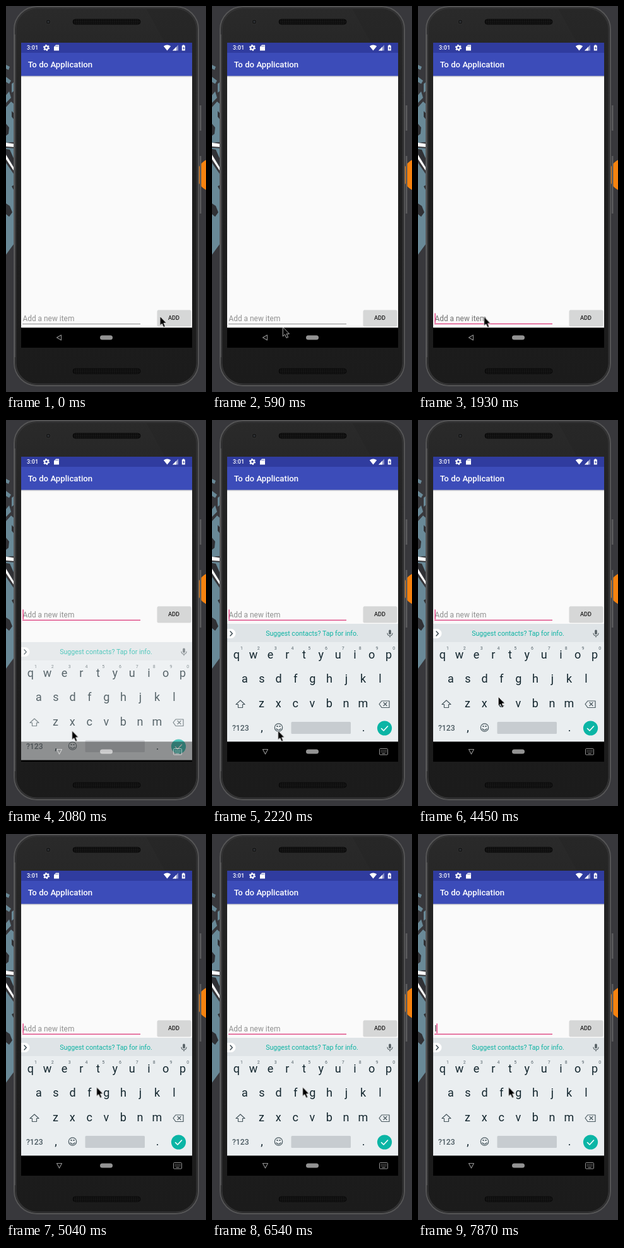
An HTML page for the animation above (8000 ms loop, 317x610 px).

```html
<!DOCTYPE html>
<html lang="en">
<head>
<meta charset="utf-8">
<title>To do Application</title>
<style>
html, body { margin: 0; width: 100%; height: 100%; overflow: hidden; background: #38383c; }
svg { display: block; width: 317px; height: 610px; font-family: Roboto, sans-serif; }
.mid { text-anchor: middle; }
.medium { font-weight: 500; }
.line { fill: none; stroke-linecap: round; stroke-linejoin: round; }
.step { animation: 8s step-end infinite; }

#pointer { animation-name: point; }
#compose { animation-name: lift; }
#focus { animation-name: focus; }
#caret { animation-name: blink; }
#hint { animation-name: hint; }
#typed { animation-name: typed; }
#keys { animation-name: rise; }
#navBg { animation-name: veil; }
#navIdle { animation-name: idle; }
#navOpen { animation-name: open; }

@keyframes point {
  0% { transform: translate(243.7px, 490px); }
  1.875% { transform: translate(207px, 501px); }
  3.75% { transform: translate(159px, 508px); }
  5.5% { transform: translate(123px, 508px); }
  7.375% { transform: translate(112px, 507px); }
  20.375%, 100% { transform: translate(104.3px, 490.5px); }
  53.875% { transform: translate(111px, 472px); }
  55.625% { transform: translate(127px, 437px); }
  57.375% { transform: translate(140px, 408px); }
  59.25%, 100% { transform: translate(143.3px, 399.5px); }
}
@keyframes lift { 0% { transform: none; } 26%, 100% { transform: translateY(-186px); } }
@keyframes focus { 0% { opacity: 0; } 22.25%, 100% { opacity: 1; } }
@keyframes blink {
  0%, 31.5%, 44.5%, 57.375%, 68.625%, 81.75% { opacity: 0; transform: none; }
  24.125%, 37.125%, 50.125%, 63%, 74.25%, 94.75% { opacity: 1; transform: none; }
  83.625%, 98.375%, 100% { opacity: 1; transform: translateX(3px); }
  91% { opacity: 0; transform: translateX(3px); }
}
@keyframes hint {
  0%, 26%, 94.75% { opacity: 1; fill: #909090; }
  22.25% { opacity: 1; fill: #707070; }
  83.625%, 98.375%, 100% { opacity: 0; fill: #909090; }
}
@keyframes typed { 0%, 94.75% { opacity: 0; } 83.625%, 98.375%, 100% { opacity: 1; } }
@keyframes rise {
  0% { opacity: 0; transform: none; }
  26% { opacity: .7; transform: translateY(29px); }
  27.75%, 100% { opacity: 1; transform: none; }
}
@keyframes veil { 0%, 27.75%, 100% { opacity: 1; } 26% { opacity: .4; } }
@keyframes idle { 0% { opacity: 1; } 26%, 100% { opacity: 0; } }
@keyframes open { 0% { opacity: 0; } 26%, 100% { opacity: 1; } }
</style>
</head>
<body>
<svg viewBox="0 0 317 610">
  <defs>
    <linearGradient id="body" x2="0" y2="1">
      <stop offset="0" stop-color="#2a2a2a"/>
      <stop offset=".35" stop-color="#202020"/>
      <stop offset="1" stop-color="#1b1b1b"/>
    </linearGradient>
    <linearGradient id="gloss" x2="0" y2="1">
      <stop offset="0" stop-color="#272727"/>
      <stop offset="1" stop-color="#222"/>
    </linearGradient>
    <linearGradient id="shade" x2="0" y2="1">
      <stop offset="0" stop-color="#000" stop-opacity=".25"/>
      <stop offset="1" stop-color="#000" stop-opacity="0"/>
    </linearGradient>
    <pattern id="mesh" width="3" height="3" patternUnits="userSpaceOnUse">
      <rect width="3" height="3" fill="#0b0b0b"/>
      <circle cx="1" cy="1" r=".7" fill="#303030"/>
    </pattern>
    <clipPath id="screen"><rect x="24" y="58" width="271" height="482"/></clipPath>
  </defs>

  <!-- desktop -->
  <rect width="317" height="610" fill="#38383c"/>
  <g fill="#698997">
    <path d="M0 93l6 3-2 5-4-2zM0 112l8 6-3 5-5-3zM9 123l5-4v14l-5 4zM0 141l5-6 3 10-8 8z"/>
    <path d="M0 160l8-9 6 5v59l-14 1zM0 224l14 1v30L0 232zM0 248l14 20v106l-6 8-8 11z"/>
  </g>
  <path d="M0 186l5 6-1 10-4 3zM9 166l5 5v10l-5-6zM0 226l6 1 8 18v10L0 233zM0 312l6 4 4 10-5 7-5-4zM9 285l5-3v12z" fill="#303135"/>
  <path d="M0 216l14 2v5l-14-1zM0 235l14 23v5L0 242z" fill="#fff"/>
  <circle cx="329" cy="267" r="26.5" fill="#f5820f"/>

  <!-- phone -->
  <path d="M307 157h2.5v40h-2.5zM307 237h2.5v91h-2.5z" fill="#5b5b5d"/>
  <rect x="13" y="1" width="292" height="599" rx="36" fill="url(#body)" stroke="#555556" stroke-width="2"/>
  <path d="M222 4H268a33 33 0 0 1 33 33V180L295 150V58H252z" fill="url(#gloss)"/>
  <rect x="15.5" y="3.5" width="287" height="594" rx="33.5" fill="none" stroke="#333334" stroke-width="2"/>
  <path d="M14 45v510" stroke="#6a6a6a" stroke-width=".8"/>
  <circle cx="67" cy="25" r="4" fill="#1a1a1a" stroke="#303030"/>
  <circle cx="67" cy="25" r="1.5" fill="#30343a"/>
  <rect x="106" y="21" width="107" height="8" rx="4" fill="url(#mesh)" stroke="#080808"/>
  <rect x="106" y="573" width="107" height="8" rx="4" fill="url(#mesh)" stroke="#080808"/>

  <g clip-path="url(#screen)">
    <rect x="24" y="58" width="271" height="482" fill="#fafafa"/>
    <rect x="24" y="110" width="271" height="3" fill="url(#shade)"/>
    <rect x="24" y="74" width="271" height="36.5" fill="#3c4cb9"/>
    <rect x="24" y="58" width="271" height="16" fill="#303c9f"/>
    <g fill="#fff">
      <text x="33" y="69.3" font-size="9.2" class="medium">3:01</text>
      <circle cx="64" cy="66" r="2.8" fill="none" stroke="#fff" stroke-width="2"/>
      <circle cx="64" cy="66" r="4.3" fill="none" stroke="#fff" stroke-width="1.6" stroke-dasharray="2.25 2.25"/>
      <path d="M79 61.5h5v9h-8v-6z"/>
      <path d="M78.7 62.8v1.6M80.5 62.8v1.6M82.3 62.8v1.6" stroke="#303c9f" stroke-width=".8"/>
      <path d="M249.8 63.5q5.7-4 11.4 0L255.5 70.5z"/>
      <path d="M273 61.5v9h-9z" opacity=".45"/>
      <path d="M270 64.5v6h-6z"/>
      <path d="M280 61.5h2.5v1h1.3v8h-5v-8h1.2z"/>
      <path d="M281.8 64l-1.7 3h1.2v2.5l1.7-3.2h-1.2z" fill="#303c9f"/>
      <text x="34.7" y="97" font-size="13.2" class="medium">To do Application</text>
    </g>

    <g id="compose" class="step">
      <text id="hint" class="step" x="26.5" y="498" font-size="11.9">Add a new item</text>
      <text id="typed" class="step" x="26.5" y="498" font-size="11.9" fill="#303030">l</text>
      <rect x="26" y="502" width="187" height="1" fill="#909090"/>
      <rect id="focus" class="step" x="26" y="501.7" width="187" height="1.3" fill="#dc3d7c"/>
      <rect id="caret" class="step" x="26.4" y="485.5" width="1.4" height="15.5" fill="#e5397d"/>
      <rect x="239.5" y="480.7" width="54" height="25.8" rx="2" fill="#000" opacity=".15"/>
      <rect x="240" y="480.5" width="53" height="25" rx="1.5" fill="#d6d7d7"/>
      <text x="266" y="496.2" font-size="9.2" class="mid medium" fill="#1e1e1e">ADD</text>
    </g>

    <g id="keys" class="step">
      <rect x="24" y="322" width="271" height="186.5" fill="#eaeef0"/>
      <rect x="24" y="322" width="271" height="29" fill="#dfe4e7"/>
      <path d="M24 330h6a7.5 7.5 0 0 1 0 15h-6z" fill="#fff"/>
      <path class="line" d="M29 334l3.3 3.5-3.3 3.5" stroke="#37474f" stroke-width="1.4"/>
      <text x="158.5" y="341" font-size="10.6" class="mid" fill="#0cb3a3">Suggest contacts? Tap for info.</text>
      <rect x="280.2" y="331.5" width="3.6" height="7.5" rx="1.8" fill="#555f64"/>
      <path class="line" d="M278 337a4 4 0 0 0 8 0M282 341v2" stroke="#555f64" stroke-width="1.2"/>
      <g id="letters" fill="#13262e"></g>
      <g class="line" stroke="#4b5a61" stroke-width="1.2">
        <path d="M45 443l7 6.5h-3.5v5h-7v-5H38z"/>
        <path d="M265 449l4-5h12v10.5h-12zM272 446.5l5 5M277 446.5l-5 5"/>
        <circle cx="105.5" cy="486" r="6.2"/>
        <path d="M102 488q3.5 4 7 0"/>
      </g>
      <path d="M102.5 483h2v2h-2zM106.5 483h2v2h-2z" fill="#4b5a61"/>
      <text x="45.3" y="491" font-size="12.2" class="mid medium" fill="#4b5a61">?123</text>
      <rect x="125.5" y="477" width="94.5" height="19" rx="1.5" fill="#c7ccd0"/>
      <circle cx="273.5" cy="487" r="11.6" fill="#0bb5a5"/>
      <path class="line" d="M268.5 487.5l3.5 3.5 6.5-7" stroke="#fff" stroke-width="1.6"/>
    </g>

    <rect id="navBg" class="step" x="24" y="508.3" width="271" height="31.7"/>
    <rect x="24" y="537.5" width="271" height="2.5"/>
    <g opacity=".58">
      <rect x="149" y="520.5" width="20" height="7" rx="3.5" fill="#fff"/>
      <path id="navIdle" class="step line" d="M87.500 520v8l-7-4z" stroke="#fff" stroke-width="1.1"/>
      <g id="navOpen" class="step">
        <path class="line" d="M80.5 520.5h8l-4 7.5z" stroke="#fff" stroke-width="1.1"/>
        <rect x="265.5" y="519.5" width="13" height="9.5" rx="1" fill="none" stroke="#fff"/>
        <path d="M267.5 522.5h9.5M267.5 524.7h9.5" stroke="#fff" stroke-dasharray="1.2 .8"/>
        <path d="M269.5 527h5" stroke="#fff"/>
      </g>
    </g>
  </g>

  <g id="pointer" class="step">
    <path d="M.3.4V15L3.500 12 6 17.500 8.500 16.400 6.200 11.100H10.500z" fill="#000" stroke="#fff" stroke-width=".7"/>
  </g>
</svg>
<script>
const letters = document.getElementById('letters');

function label(text, x, y, size) {
  const el = document.createElementNS(letters.namespaceURI, 'text');
  el.setAttribute('x', x);
  el.setAttribute('y', y);
  el.setAttribute('font-size', size);
  el.setAttribute('class', 'mid');
  el.textContent = text;
  letters.append(el);
  return el;
}

const pitch = 26.8;
[['qwertyuiop', 38.8, 376.5], ['asdfghjkl', 52, 415.3], ['zxcvbnm', 78.5, 454]].forEach(([row, x, y]) =>
  [...row].forEach((key, i) => label(key, x + i * pitch, y, 18)));
[...'1234567890'].forEach((digit, i) =>
  label(digit, 47 + i * pitch, 363.3, 7).setAttribute('fill', '#56646b'));
label(',', 79, 492, 18);
label('.', 240, 492, 18);
</script>
</body>
</html>
```
